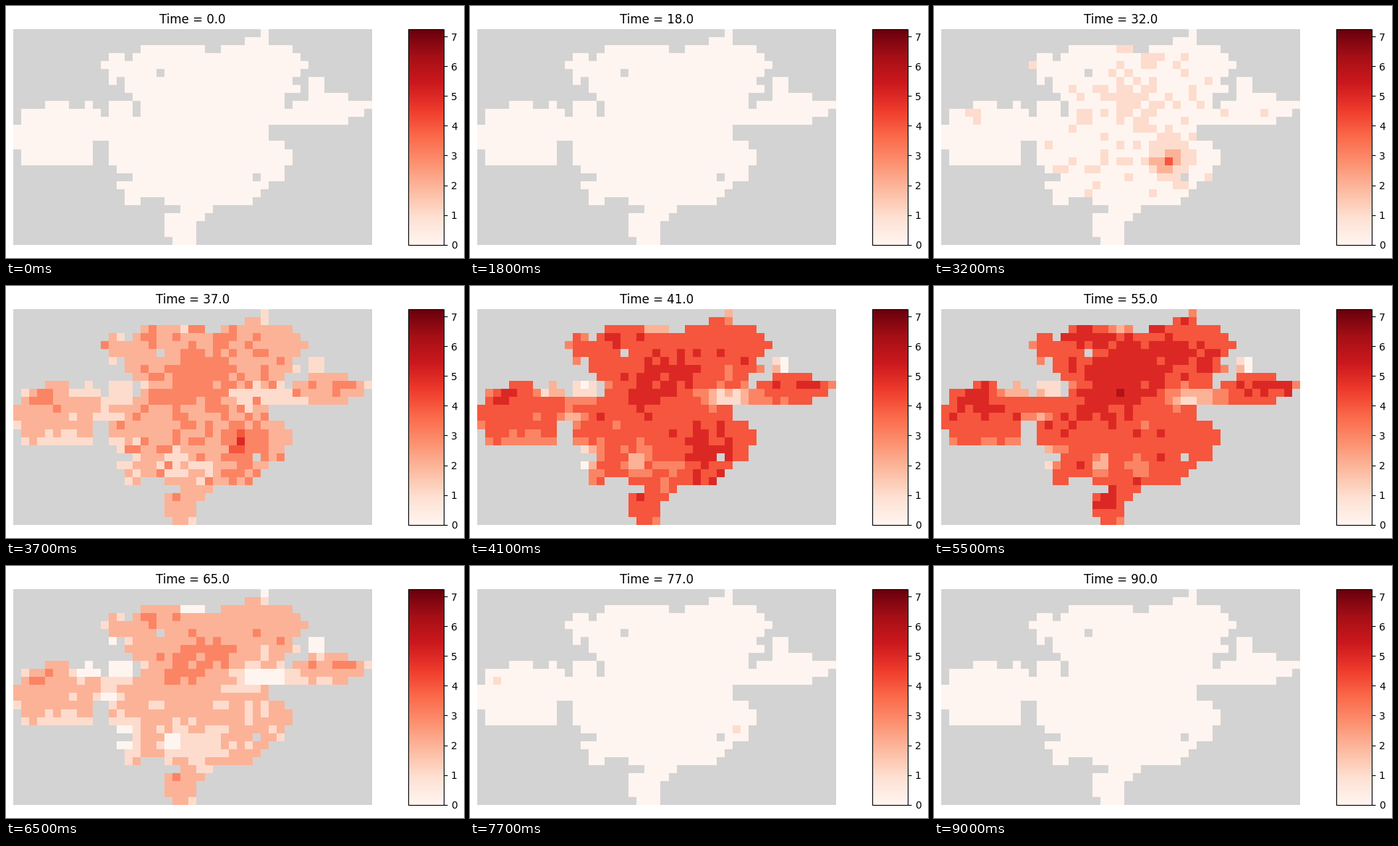
These frames come from a looping animation (633x348 px, 9100 ms). A matplotlib script:

```python
import numpy as np
import matplotlib.pyplot as plt
from matplotlib.animation import FuncAnimation
from matplotlib.path import Path

W, H, DPI = 633, 348, 100
ROWS, COLS, STEPS = 27, 45, 91
VMAX = 7.243
rng = np.random.default_rng(11)
row, col = np.mgrid[:ROWS, :COLS]

# Outline of the mainland in cell units (x, y)
MAINLAND = [
    (16, 2), (24, 2), (24, 3), (26, 3), (26, 2.4), (29, 1.4), (31, 1),
    (31, 0), (32, 0), (32, 2), (35, 2), (37, 4.2), (37, 4.8), (35, 6.8),
    (36, 7), (36, 8), (34, 8), (34, 12), (32, 12), (32, 14), (34, 14),
    (35, 15.4), (35, 17), (34, 17), (34, 19), (32.5, 19), (30, 22),
    (25.2, 22), (23, 24.2), (23, 27), (20, 27), (20, 26), (19, 26),
    (19, 23), (22, 22.3), (19, 21.9), (19, 21), (16, 21), (16, 22),
    (14, 22), (14, 20.4), (13, 19.4), (15, 18.6), (15, 18.4), (13, 17.6),
    (12, 16.8), (12, 9), (15, 9), (15, 11), (16, 11), (16.2, 10),
    (14.2, 8), (14, 6), (13, 6), (13, 7), (12, 7), (12, 5), (11, 5),
    (11, 4), (12, 4), (12, 3), (14, 3), (14, 4), (15, 4),
]
WEST = [(12, 11), (11, 11), (11, 10), (10, 10), (10, 9), (9, 9), (9, 10),
        (7, 10), (7, 9), (4, 9), (4, 10), (1, 10), (1, 12), (0, 12),
        (0, 15), (1, 15), (1, 17), (10, 17), (10, 14), (12, 14)]
EAST = [(34, 10), (35, 10), (35, 9), (37, 9), (37, 6), (39, 6), (39, 8),
        (42, 8), (42, 9), (45, 9), (44, 11), (42, 11), (42, 12), (34, 12)]
LAKES = (row == 5) & (col == 18) | (row == 18) & (col == 30)

# Density hills and hollows: x, y, spread in x, spread in y, height
HILLS = [
    (21, 10, 2.6, 1.6, 1.3), (23, 6.5, 3, 1.3, 0.85), (18, 3, 3, 1.2, 0.7),
    (31, 5, 4, 2.2, 0.55), (26.5, 9, 1.2, 1.5, 0.7), (40, 9, 4, 0.8, 0.85),
    (4, 11, 4, 1.6, 0.65), (15, 13, 3, 1.2, 0.4), (28, 18, 3.5, 3, 0.4),
    (20, 23, 1.2, 1.2, 0.9),
    (31, 10.5, 2.6, 0.8, -3), (38, 6.5, 1.2, 0.8, -4),
    (13, 9.5, 1.6, 0.8, -4), (8.5, 9.7, 1.4, 0.7, -2.5),
    (11.5, 13, 1.2, 0.6, -2.2), (19.5, 18.7, 0.7, 0.8, -2.8),
    (23.5, 18.8, 1.3, 1, -1.2), (13, 18, 1, 1.2, -3),
    (22, 2, 1, 0.5, -2.8), (6, 16, 2.5, 0.6, -1),
]


def bell(x, y, sx, sy):
    return np.exp(-(((col - x) / sx) ** 2 + ((row - y) / sy) ** 2) / 2)


def build_land():
    centres = np.column_stack([col.ravel() + 0.5, row.ravel() + 0.5])
    land = np.zeros(row.size, bool)
    for outline in (MAINLAND, WEST, EAST):
        land |= Path(outline + outline[:1]).contains_points(centres)
    return land.reshape(row.shape) & ~LAKES


def build_density(land):
    """Hills plus noise, thinning out where little land surrounds a cell."""
    pad = np.pad(land, 1).astype(float)
    near = sum(pad[i:i + ROWS, j:j + COLS]
               for i in range(3) for j in range(3)) / 9
    d = 4.6 + sum(h * bell(*place) for *place, h in HILLS)
    d -= 6 * np.clip(0.55 - near, 0, None)
    return np.clip(d + rng.normal(0, 0.24, d.shape), 0, 6.2)


def build_cases():
    """First cases: scattered round the centre, rising towards the origin."""
    chance = 0.04 + 0.42 * bell(23, 9, 5.5, 5)
    scatter = np.where(rng.random(row.shape) < chance, 1.5, 0)
    dist = np.hypot(col - 28, row - 16)
    origin = 4.4 - 1.9 * np.sqrt(dist)
    origin += rng.uniform(-0.5, 0.5, row.shape) * (dist > 0)
    return np.maximum(scatter, origin)


land = build_land()
density = build_density(land)
cases = build_cases()
lead = 1.6 * bell(28, 17.5, 3.3, 3.3)
tail = (row == 11) & (col == 2) | (row == 17) & (col == 32)


def wave(s):
    """Log-scale epidemic curve: steep rise, slower decay."""
    return 2.16 - np.log(np.exp(-0.5 * s) + np.exp(0.24 * s))


def levels(t):
    v = density + wave(t - 46 + lead)
    if t < 41:
        v = np.maximum(v, np.minimum(cases + 0.3 * (t - 32), 5))
    elif t < 80:
        v = np.maximum(v, tail)
    return np.ma.array(np.floor(np.clip(v, 0, 7)), mask=~land)


def box(x, y, w, h):
    return [x / W, 1 - (y + h) / H, w / W, h / H]


fig = plt.figure(figsize=(W / DPI, H / DPI), dpi=DPI, facecolor="white")
ax = fig.add_axes(box(10, 32.15, 496, 297.6))
cax = fig.add_axes(box(555.6, 32.15, 49.6, 297.6))
cmap = plt.get_cmap("Reds").copy()
cmap.set_bad("lightgray")
img = ax.imshow(levels(0), cmap=cmap, vmin=0, vmax=VMAX,
                interpolation="nearest", aspect="auto")
ax.axis("off")
title = ax.set_title("Time = 0.0", fontsize=12)
fig.colorbar(img, cax=cax)


def update(t):
    img.set_data(levels(t))
    title.set_text(f"Time = {t:.1f}")
    return img, title


anim = FuncAnimation(fig, update, frames=STEPS, interval=100,
                     repeat=True, repeat_delay=0)
plt.show()
```
